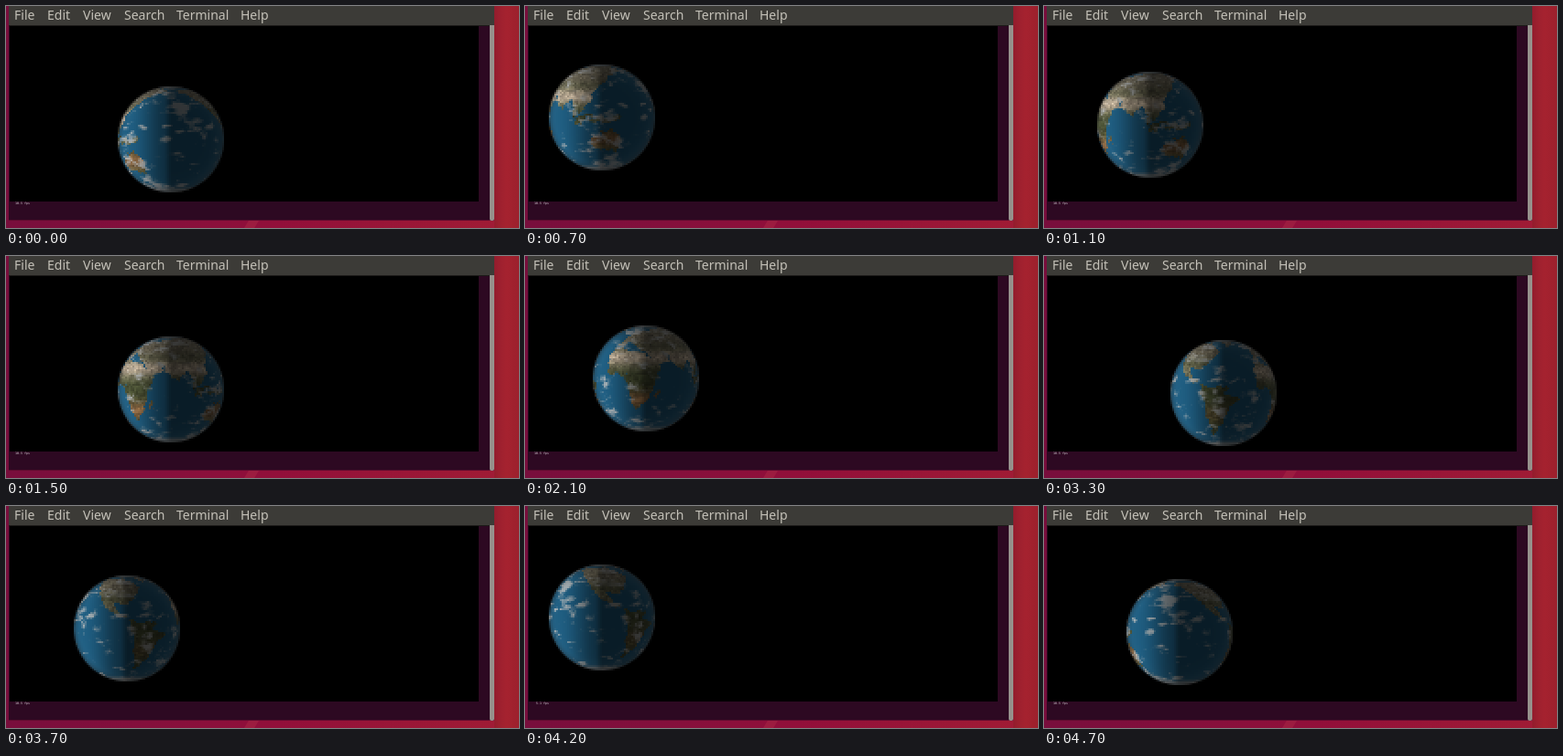
Recreate the animation shown at these times as an HTML page with a canvas. Size 560x243 px, loop 4.8 s.

```html
<!DOCTYPE html>
<html lang="en">
<head>
<meta charset="utf-8">
<title>Spinning globe in a terminal</title>
<style>
html, body { margin: 0; width: 100%; height: 100%; overflow: hidden; }
#stage {
  position: relative; width: 560px; height: 243px; overflow: hidden;
  background: linear-gradient(90deg, #780e3c 0, #840f3c 150px, #920f3a 300px, #a01b35 533px, #a3222f 560px);
}
#stage > * { position: absolute; }
#shine { left: 260px; top: 235px; width: 16px; height: 8px; background: #9c1c40; clip-path: polygon(30% 0, 100% 0, 70% 100%, 0 100%); }
#side { left: 533px; top: 0; width: 27px; height: 243px; background: linear-gradient(90deg, #931c2d, #a0212f 8px, #a5222f 14px, #9c202d); }
#term { left: 3px; top: 21px; width: 529px; height: 213px; background: #2d0922; border: solid #5c0c2e; border-width: 0 1px 1px 0; }
#bar { left: 3px; top: 0; width: 530px; height: 21px; background: #3c3b37; border-bottom: 1px solid #1c1a18; }
#scroll { left: 528px; top: 21px; width: 5px; height: 214px; background: #96918c; border-radius: 0 0 2px 2px; }
#view { left: 4px; top: 22px; background: #000; }
.menu { top: 0; font: 14px/19px "Noto Sans", "Open Sans", sans-serif; color: #c4c1b8; }
#fps { left: 10px; top: 214px; font: 3.33px/4px "DejaVu Sans Mono", monospace; color: #d8d0d6; white-space: pre; }
</style>
</head>
<body>
<div id="stage">
  <div id="shine"></div>
  <div id="side"></div>
  <div id="term"></div>
  <div id="bar"></div>
  <canvas id="view" width="512" height="192"></canvas>
  <div id="scroll"></div>
  <span class="menu" style="left:9px">File</span>
  <span class="menu" style="left:45px">Edit</span>
  <span class="menu" style="left:84px">View</span>
  <span class="menu" style="left:129px">Search</span>
  <span class="menu" style="left:186px">Terminal</span>
  <span class="menu" style="left:256px">Help</span>
  <span id="fps"></span>
</div>
<script>
const W = 360, H = 180, RAD = Math.PI / 180;
const clamp = (v, a, b) => Math.min(b, Math.max(a, v));
const mix = (a, b, t) => a + (b - a) * t;
const blend = (a, b, t) => a.map((v, k) => mix(v, b[k], t));
const bell = (v, mid, width) => Math.exp(-(((v - mid) / width) ** 2));
const smooth = (a, b, v) => { const t = clamp((v - a) / (b - a), 0, 1); return t * t * (3 - 2 * t); };

function hash(x, y, z) {
  let h = Math.imul(x, 374761393) ^ Math.imul(y, 668265263) ^ Math.imul(z, 1274126177);
  h = Math.imul(h ^ (h >>> 13), 1103515245);
  return ((h ^ (h >>> 16)) >>> 0) / 4294967296;
}

function noise(x, y, z) {
  const i = Math.floor(x), j = Math.floor(y), k = Math.floor(z);
  const u = smooth(0, 1, x - i), v = smooth(0, 1, y - j), w = smooth(0, 1, z - k);
  const row = (b, c) => mix(hash(i, b, c), hash(i + 1, b, c), u);
  const face = c => mix(row(j, c), row(j + 1, c), v);
  return mix(face(k), face(k + 1), w);
}

const fbm = (x, y, z) =>
  .5 * noise(x, y, z) + .3 * noise(x * 2.1, y * 2.1, z * 2.1) + .2 * noise(x * 4.3, y * 4.3, z * 4.3);

// Rough continents from a few corners; noise roughens the coasts when sampled
function drawLand() {
  const c = document.createElement('canvas');
  c.width = W; c.height = H;
  const g = c.getContext('2d', { willReadFrequently: true });
  const shape = (...corners) => {
    g.beginPath();
    corners.forEach(([lon, lat]) => g.lineTo(lon + 180, 90 - lat));
    g.fill();
  };
  const island = (lon, lat, rx, ry) => {
    g.beginPath();
    g.ellipse(lon + 180, 90 - lat, rx, ry, 0, 0, 7);
    g.fill();
  };
  shape([-165, 68], [-95, 72], [-57, 52], [-82, 28], [-97, 28], [-82, 9], [-108, 23], [-125, 45]);
  shape([-79, 9], [-60, 9], [-35, -7], [-55, -34], [-70, -54], [-72, -18]);
  shape([-8, 35], [32, 31], [51, 11], [36, -22], [20, -35], [10, 4], [-8, 5], [-17, 18]);
  shape([-9, 37], [15, 42], [35, 31], [45, 13], [60, 23], [77, 8], [90, 22], [103, 2], [122, 30],
    [140, 52], [178, 66], [100, 77], [8, 60]);
  shape([114, -23], [135, -12], [153, -27], [148, -38], [116, -34]);
  island(-42, 72, 14, 9);
  island(47, -19, 2, 6);
  for (let i = 0; i < 10; i++) island(98 + 5 * i, 3 * Math.cos(i * 2.2) - .4 * i, 3.5, 2.5);
  return g.getImageData(0, 0, W, H).data;
}

// Sandy belts near the tropics, green at the equator, tan in the north
function landColor(lon, lat) {
  const dry = bell(Math.abs(lat), 24, 11) * (lon < -30 ? .4 : 1);
  const base = blend([80, 88, 56], [138, 130, 108], smooth(28, 50, lat));
  return blend(base, lat > 0 ? [208, 190, 165] : [158, 116, 74], dry);
}

function makeEarth() {
  const land = drawLand(), map = [];
  for (let y = 0; y < H; y++) for (let x = 0; x < W; x++) {
    const lat = 90 - y, lon = x - 180;
    const r = Math.cos(lat * RAD), py = Math.sin(lat * RAD);
    const px = r * Math.cos(x * RAD), pz = r * Math.sin(x * RAD);
    const wobble = s => Math.round(8 * (noise(px * 9 + s, py * 9, pz * 9) - .5));
    const near = clamp(y + wobble(40), 0, H - 1) * W + (x + wobble(70) + W) % W;
    const grain = .75 + .5 * noise(px * 22, py * 22, pz * 22);
    const polar = .12 * smooth(-38, -60, lat) + .08 * smooth(42, 65, lat);
    const cloud = .85 * smooth(.55, .78, fbm(px * 4 + 9, py * 8 + 5, pz * 4 + 3) + polar);
    const ice = .8 * Math.max(smooth(-62, -72, lat), smooth(70, 80, lat));
    const soil = landColor(lon, lat).map(v => v * grain);
    const ground = blend([34, 104, 144], soil, land[near * 4 + 3] / 255);
    map.push(blend(blend(ground, [185, 190, 192], ice), [205, 208, 208], cloud));
  }
  return map;
}

const SIZE = 58;
const earth = makeEarth();
const ball = document.createElement('canvas');
ball.width = ball.height = SIZE;
const ballCtx = ball.getContext('2d');
const img = ballCtx.createImageData(SIZE, SIZE);
const view = document.getElementById('view').getContext('2d');
const fps = document.getElementById('fps');
view.imageSmoothingEnabled = false;

function paintBall(facing) {
  for (let j = 0; j < SIZE; j++) for (let i = 0; i < SIZE; i++) {
    const x = (i + .5) / SIZE * 2 - 1, y = 1 - (j + .5) / SIZE * 2;
    const o = (j * SIZE + i) * 4, rad = Math.hypot(x, y);
    img.data[o + 3] = 255 * clamp((1 - rad) * SIZE / 2 + .5, 0, 1);
    const z = Math.sqrt(Math.max(0, 1 - rad * rad));
    const lon = facing + Math.atan2(x, z) / RAD, lat = Math.asin(y) / RAD;
    const u = (Math.floor(lon + 180) + 2 * W) % W;
    const v = clamp(Math.floor(90 - lat), 0, H - 1);
    const light = .27 + .17 * smooth(.02, -.14, x) + .45 * smooth(-.05, -.8, x);
    const limb = mix(.5, 1, smooth(0, .5, z)), haze = 30 * (1 - z) ** 3;
    earth[v * W + u].forEach((c, k) => { img.data[o + k] = c * light * limb + haze; });
  }
  ballCtx.putImageData(img, 0, 0);
}

// Steps at which the ball waits a tick, or jumps one to catch up
const stalls = [17, 40, 41], skips = [2, 44];

function draw(step) {
  const passed = list => list.filter(s => s <= step).length;
  const tick = step - 1 + passed(skips) - passed(stalls);
  const pos = 4 + Math.abs((tick + 16) % 16 - 8);
  paintBall(178 - 7.2 * tick);
  view.clearRect(0, 0, 512, 192);
  view.drawImage(ball, 16 * pos - 58, 4 * pos + 22, SIZE * 2, SIZE * 2);
  const slow = stalls.includes(step - 1) && !stalls.includes(step);
  fps.textContent = slow ? ' 5.1 fps' : '10.5 fps';
}

const start = performance.now();
let shown = -1;
function frame() {
  const step = Math.floor((performance.now() - start) % 4800 / 100);
  if (step !== shown) draw(shown = step);
  requestAnimationFrame(frame);
}
frame();
</script>
</body>
</html>
```
